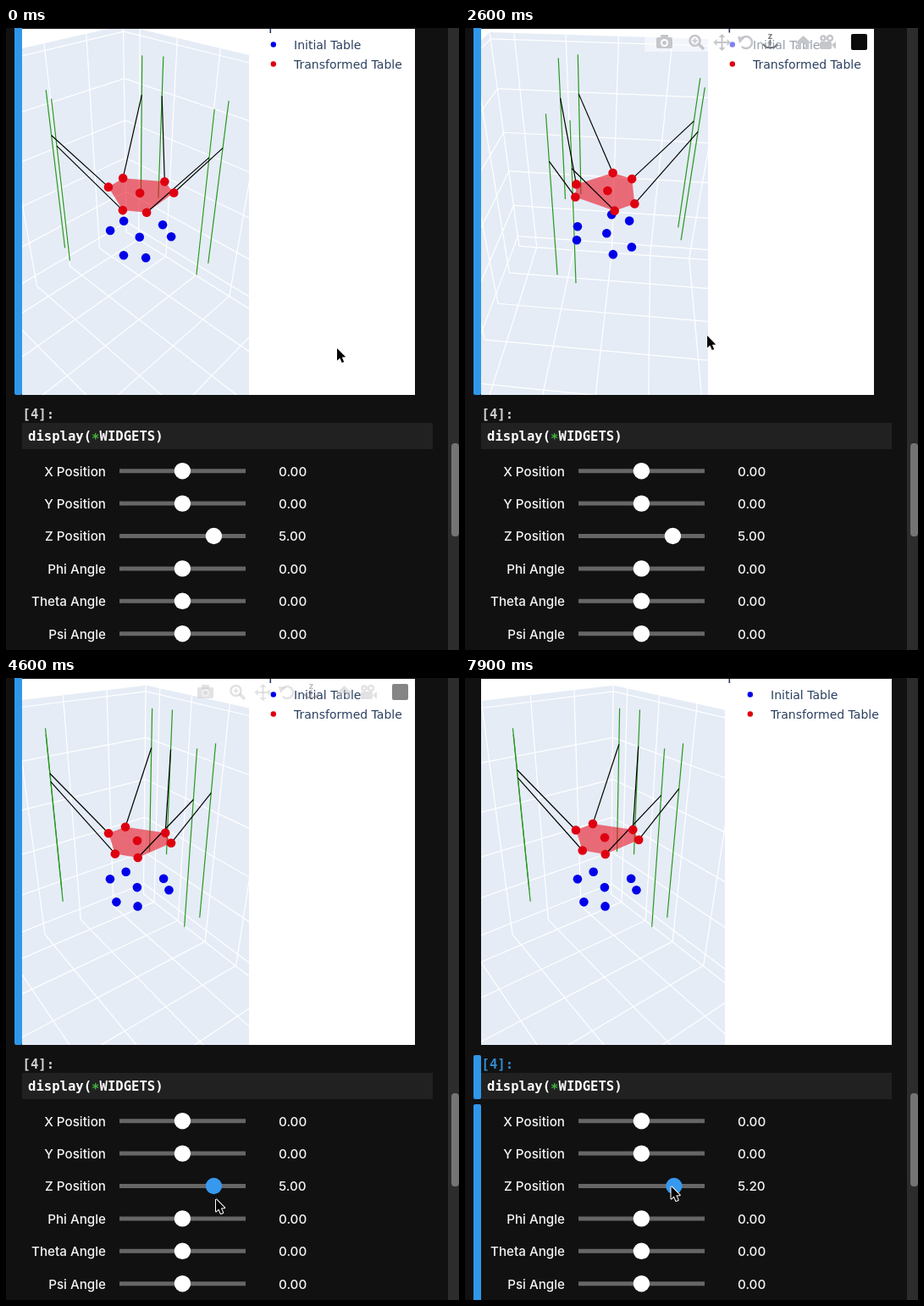
Write an HTML page with a canvas that moves like this. It is 535 px wide and 734 px high and loops after 8000 ms.

```html
<!DOCTYPE html>
<html lang="en">
<head>
<meta charset="utf-8">
<title>Table position widgets</title>
<style>
html, body { margin: 0; width: 100%; height: 100%; overflow: hidden; background: #111; }
canvas { display: block; width: 535px; height: 734px; }
</style>
</head>
<body>
<canvas id="stage" width="535" height="734"></canvas>
<script>
const ctx = document.getElementById('stage').getContext('2d');
const LOOP = 8000, STEP = 100, RAD = Math.PI / 180;
const clamp = (v, low, high) => Math.min(high, Math.max(low, v));
const ease = (t, from, to) => (1 - Math.cos(Math.PI * clamp((t - from) / (to - from), 0, 1))) / 2;

// Motion: the pointer drags the scene round, then drags the height slider
const GRAB = 1100, RELEASE = 3970, PRESS = 5300;
const MOVES = [
  { from: 100, to: 800, x: 92, y: 420 },
  { from: GRAB, to: 1930, x: 296, y: 363 },
  { from: 2400, to: RELEASE, x: 44.5, y: 366 },
  { from: RELEASE, to: 4250, x: 140, y: 420 },
  { from: 4300, to: 4600, x: 248, y: 615 },
  { from: 4700, to: 5200, x: 242, y: 600 },
];

function pointerAt(t) {
  let x = 391, y = 378;
  for (const move of MOVES) {
    const p = ease(t, move.from, move.to);
    x += (move.x - x) * p;
    y += (move.y - y) * p;
  }
  return [x, y];
}
const azimuthAt = t => 63.4 - 0.2 * pointerAt(clamp(t, GRAB, RELEASE))[0];
const elevationAt = t => 35.3 + 2.7 * ease(t, GRAB, 1930) - 7.6 * ease(t, 2400, 3370);
const heightAt = t => 5 - 1.6 * ease(t, 5200, 5900) + 3 * ease(t, 6150, 7150) - 1.2 * ease(t, 7350, 7950);

// Scene geometry, in camera units
const UNIT = 0.0513, GROUND = -0.101, RAIL_TOP = GROUND + 15 * UNIT, ARM_RISE = 0.327;
const HX = 0.48, HY = 0.57, HZ = 0.7, FAR = 0.9;
const polar = (radius, deg) => [radius * Math.cos(deg * RAD), radius * Math.sin(deg * RAD)];
const CENTER = polar(0.074, 60.5);
const around = (radius, deg) => polar(radius, deg).map((v, i) => v + CENTER[i]);
const rails = [], joints = [];
for (let k = 0; k < 3; k++) for (const side of [-1, 1]) {
  rails.push(around(0.365, 95.7 + 120 * k + side * 7.7));
  joints.push(around(0.1555, 95.7 + 120 * k + side * 40.4));
}

function camera(azimuth, elevation, cx) {
  const sa = Math.sin(azimuth * RAD), ca = Math.cos(azimuth * RAD);
  const se = Math.sin(elevation * RAD), ce = Math.cos(elevation * RAD);
  return (x, y, z) => {
    const near = x * ca + y * sa, k = 521 / (2.165 - near * ce - z * se);
    return [cx + (y * ca - x * sa) * k, 217 - (z * ce - near * se) * k];
  };
}

function path(points) {
  ctx.beginPath();
  points.forEach(p => ctx.lineTo(p[0], p[1]));
}
function fill(points, color) {
  path(points);
  ctx.fillStyle = color;
  ctx.fill();
}
function stroke(points, color, width) {
  path(points);
  ctx.strokeStyle = color;
  ctx.lineWidth = width;
  ctx.stroke();
}
function dot(x, y, r, color) {
  ctx.beginPath();
  ctx.arc(x, y, r, 0, 7);
  ctx.fillStyle = color;
  ctx.fill();
}
function ring(x, y, r, color, gap = 0) {
  ctx.beginPath();
  ctx.arc(x, y, r, gap - Math.PI, Math.PI - gap);
  ctx.strokeStyle = color;
  ctx.lineWidth = 2.5;
  ctx.stroke();
}
function rect(x, y, w, h, color, radius = 0) {
  ctx.beginPath();
  ctx.roundRect(x, y, w, h, radius);
  ctx.fillStyle = color;
  ctx.fill();
}
function text(str, x, y, font, color, align = 'left') {
  ctx.font = font;
  ctx.textAlign = align;
  ctx.fillStyle = color;
  ctx.fillText(str, x, y);
}
function clipped(x, y, w, h, paint) {
  ctx.save();
  ctx.beginPath();
  ctx.rect(x, y, w, h);
  ctx.clip();
  paint();
  ctx.restore();
}

function drawWalls(project) {
  const line = (a, b) => stroke([project(...a), project(...b)], '#fff', 1.2);
  const ticks = (origin, low, high) =>
    Array.from({ length: 9 }, (_, i) => origin + (i - 2) * 5 * UNIT).filter(v => v > low && v < high);
  for (const x of ticks(CENTER[0], -HX, FAR)) {
    line([x, -HY, -HZ], [x, -HY, HZ]);
    line([x, -HY, -HZ], [x, FAR, -HZ]);
  }
  for (const y of ticks(CENTER[1], -HY, FAR)) {
    line([-HX, y, -HZ], [-HX, y, HZ]);
    line([-HX, y, -HZ], [FAR, y, -HZ]);
  }
  for (const z of ticks(GROUND, -HZ, HZ)) {
    line([-HX, -HY, z], [FAR, -HY, z]);
    line([-HX, -HY, z], [-HX, FAR, z]);
  }
  fill([[-900, -900], project(FAR, -HY, HZ), project(-HX, -HY, HZ), project(-HX, FAR, HZ), [1400, -900]], '#fff');
}

function drawScene(t, width) {
  const project = camera(azimuthAt(t), elevationAt(t), 19 + width / 2);
  const tableZ = GROUND + UNIT * heightAt(t - 75);
  const markers = [...joints, CENTER];
  rect(19, 1, width, 432, '#e5ecf6');
  drawWalls(project);
  rails.forEach(p => stroke([project(...p, GROUND), project(...p, RAIL_TOP)], '#28981f', 1.2));
  fill(joints.map(p => project(...p, tableZ)), 'rgba(235,20,35,.6)');
  markers.forEach(p => dot(...project(...p, GROUND), 5.3, '#0000e8'));
  joints.forEach((p, i) =>
    stroke([project(...p, tableZ), project(...rails[i], tableZ + ARM_RISE)], '#000', 1.2));
  markers.forEach(p => dot(...project(...p, tableZ), 5.3, '#de0010'));
}

function drawModebar(opacity) {
  const gray = '#c5c6ca', dark = '#77787c';
  ctx.save();
  ctx.globalAlpha = opacity;
  if (opacity === 1) rect(212, 5, 266, 23, 'rgba(255,255,255,.5)');
  // still camera
  rect(226, 11, 19, 13, gray, 2);
  rect(231, 8, 9, 5, gray, 1);
  dot(235.5, 17.5, 4.5, '#fff');
  dot(235.5, 17.5, 2.5, gray);
  // zoom
  ring(271.5, 15, 6, gray);
  stroke([[276, 19], [282, 25]], gray, 3.5);
  stroke([[268.5, 15], [274.5, 15]], gray, 1.5);
  stroke([[271.5, 12], [271.5, 18]], gray, 1.5);
  // pan
  for (const [dx, dy] of [[1, 0], [-1, 0], [0, 1], [0, -1]]) {
    const x = 303.5 + dx * 6, y = 17 + dy * 6;
    stroke([[303.5, 17], [x, y]], gray, 2);
    fill([[x + dx * 4, y + dy * 4], [x + dy * 4, y + dx * 4], [x - dy * 4, y - dx * 4]], gray);
  }
  // orbit
  ring(332, 17, 7, gray, 0.75);
  fill([[322, 10], [331, 11], [324, 18]], gray);
  // turntable
  text('z', 360.5, 13, 'bold 11px "Open Sans", sans-serif', dark, 'center');
  stroke([[360.5, 14], [360.5, 21]], dark, 1.8);
  stroke([[352, 19], [356, 23], [365, 23], [369, 19]], dark, 2);
  // home
  fill([[390, 18], [399.5, 9], [409, 18]], gray);
  rect(393, 17, 4, 8, gray);
  rect(402, 17, 4, 8, gray);
  // film camera
  ring(423, 12, 2.5, gray);
  ring(431, 12, 3, gray);
  rect(419, 16, 14, 9, gray, 2);
  fill([[433, 20], [438, 16], [438, 25]], gray);
  rect(456, 7, 19, 19, '#0b0b0b', 2);
  ctx.restore();
}

function drawPlot(t, dragging) {
  const shift = dragging ? 21 : 0, sceneWidth = dragging ? 288 : 268;
  rect(19, 1, 464 + shift, 432, '#fff');
  clipped(19, 1, sceneWidth, 432, () => drawScene(t, sceneWidth));
  clipped(19, 1, 464 + shift, 432, () =>
    text('Initial and Transformed Table positions', 33, 1, '20px "Open Sans", sans-serif', '#2a3f5f'));
  [['Initial Table', '#0000e8'], ['Transformed Table', '#de0010']].forEach(([label, color], i) => {
    dot(315.8 + shift, 19.5 + 23 * i, 3.2, color);
    text(label, 340 + shift, 25 + 23 * i, '14px "DejaVu Sans", sans-serif', '#2a3f5f');
  });
  if (t >= 600 && t <= 4600) drawModebar(t < 4600 ? 1 : 0.5);
}

function drawCell(dragging) {
  const blue = '#2f97e9', mono = 'bold 15.6px "DejaVu Sans Mono", monospace';
  if (dragging) {
    rect(10, 445, 9, 52, blue, 2);
    rect(10, 503, 9, 240, blue, 2);
  } else {
    rect(10, -5, 9, 438, blue, 2);
  }
  rect(19, 466, 485, 31, '#212121');
  text('[4]:', 19.5, 461, mono, dragging ? '#328bd0' : '#d0d0d0');
  text('display(', 26, 487, mono, '#fff');
  text('*', 101, 490, mono, '#43b33f');
  text('WIDGETS)', 110.5, 487, mono, '#fff');
}

function drawSliders(t) {
  const names = ['X Position', 'Y Position', 'Z Position', 'Phi Angle', 'Theta Angle', 'Psi Angle'];
  const font = '500 15.2px Inter, sans-serif';
  names.forEach((name, i) => {
    const y = 522.7 + 38.4 * i, baseline = Math.round(y + 5.8);
    const active = name[0] === 'Z';
    const value = active ? Math.round(heightAt(t) * 10) / 10 : 0;
    text(name, 118, baseline, font, '#f4f4f4', 'right');
    text(value.toFixed(2), 322, baseline, font, '#f4f4f4');
    rect(134, y - 2.5, 149, 5, '#666');
    dot(208.4 + 7.4 * value, y, 9.7, active && t >= 4600 ? '#3799ee' : '#fff');
  });
}

function drawPointer(t, dragging) {
  const [x, y] = dragging ? [204.9 + 7.4 * heightAt(t), 600] : pointerAt(t);
  const arrow = [[0, 0], [0, 14.5], [3.3, 11.5], [5.7, 17], [8.2, 16], [5.8, 10.6], [10.2, 10.3], [0, 0]];
  ctx.save();
  ctx.translate(x, y);
  ctx.lineJoin = 'round';
  stroke(arrow, '#fff', 2);
  fill(arrow, '#000');
  ctx.restore();
}

function draw(now) {
  const t = Math.floor((now % LOOP) / STEP) * STEP;
  const dragging = t >= PRESS;
  rect(0, 0, 535, 734, '#111');
  drawPlot(t, dragging);
  drawCell(dragging);
  drawSliders(t);
  rect(522, 0, 13, 734, '#2c2c2c');
  rect(526, 490, 9, 110, '#747474', 4);
  drawPointer(t, dragging);
}

const start = performance.now();
function loop() {
  draw(performance.now() - start);
  requestAnimationFrame(loop);
}
loop();
</script>
</body>
</html>
```
